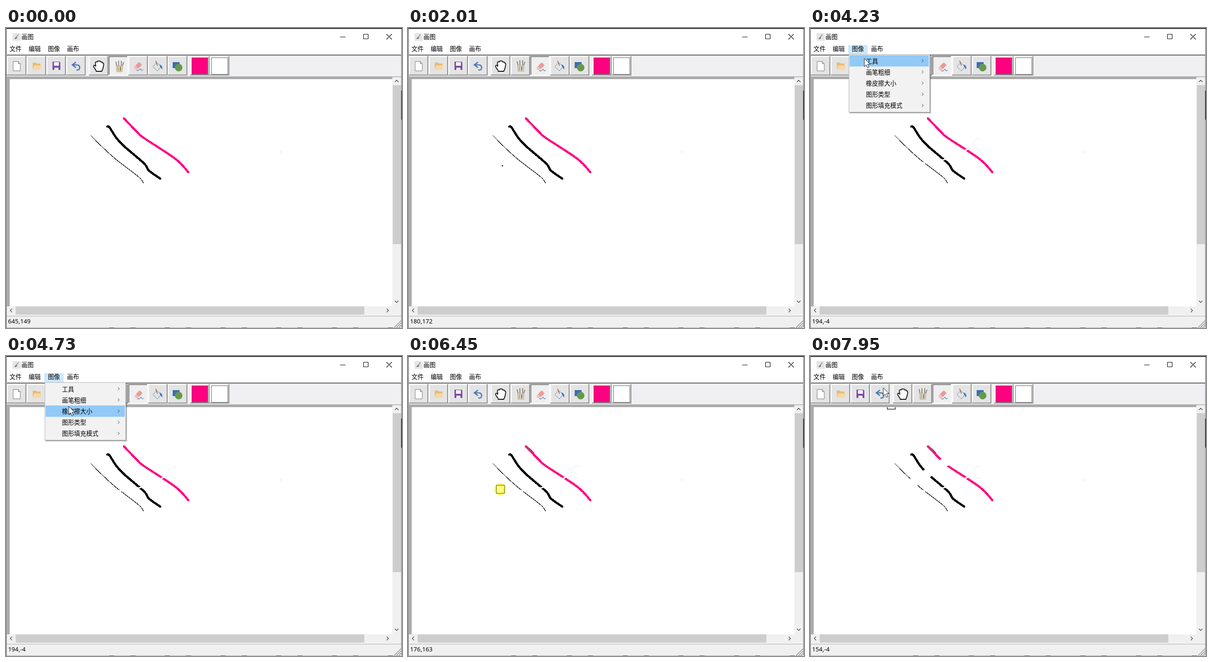
Animation, 860 px wide and 651 px high, one loop 8 s. Source, as an HTML page:

```html
<!DOCTYPE html>
<html lang="zh">
<head>
<meta charset="utf-8">
<style>
html, body { margin: 0; width: 100%; height: 100%; overflow: hidden; background: #fff; }
svg { display: block; width: 860px; height: 651px; }
text { font: 13.2px "Noto Sans", "Noto Sans CJK SC", "Noto Sans CJK", sans-serif; fill: #000; }
.line { fill: none; stroke-linecap: round; stroke-linejoin: round; }
#ink, #rubbed { shape-rendering: crispEdges; }
</style>
</head>
<body>
<svg viewBox="0 0 860 651">
  <defs>
    <clipPath id="page"><rect x="8" y="111" width="831" height="493"/></clipPath>
    <linearGradient id="fade" gradientUnits="userSpaceOnUse" x1="256" y1="196" x2="272" y2="211">
      <stop offset="0" stop-color="#ec1f7d"/><stop offset=".6" stop-color="#a9447f"/><stop offset="1" stop-color="#ff0080"/>
    </linearGradient>
  </defs>

  <!-- title bar -->
  <rect width="860" height="651" fill="#fff"/>
  <rect x="14" y="11" width="18" height="17" fill="#e6e6e6"/>
  <path d="M18 24l3-5 4 2-3 3z" fill="#7c8894"/><path d="M22 20l5-6" stroke="#8a8a8a" stroke-width="1.5"/>
  <text x="33.5" y="24">画图</text>
  <path d="M726 19.5h11M776.5 13.5h10v10h-10zM826.5 13.5l11 11m0-11l-11 11" class="line" stroke="#000" stroke-width="1.1"/>
  <rect id="hot" x="83" y="37" width="42" height="20" fill="#cce8ff"/>
  <g id="bar"></g>

  <!-- tool bar -->
  <rect x="2" y="59" width="856" height="46" fill="#f0f0f2"/>
  <rect x="2" y="57.5" width="856" height="2.5" fill="#7d7d7f"/>
  <g id="buttons"></g>
  <path d="M15.5 72.5h11l4.500 5v15.500h-15.500zM26.500 72.500v5h4.500" fill="#fff" stroke="#777"/>
  <path d="M58 75h7l2 2h8v14H58z" fill="#e6bb78"/><path d="M61 81h17l-4 10H57z" fill="#f8d8a2"/>
  <path d="M101 73h15l2 2v16h-17z" fill="#7b4ba5"/><path d="M104 74h11v8h-11zM105 86h9v5h-9z" fill="#f3eef7"/>
  <path d="M152 74l-8 6 8 6M145 80h8q7 0 7 6t-7 5" fill="none" stroke="#4677b5" stroke-width="2.600"/>
  <path d="M196 94q-1-4-4-7-3-5-1-6 2-1 4 2l-1-8q1-3 4-1 1-4 4-2 3-2 4 2 4-1 4 2 3 0 2 5-1 7-4 13z" fill="#fff" stroke="#111" stroke-width="1.800" stroke-linejoin="round"/>
  <g id="brush">
    <path d="M239 82l-2-10m6 10v-12m6 12v-12m2 12l3-9" stroke="#85786a" stroke-width="1.800"/>
    <path d="M238 81h14l-1 13h-12z" fill="#d6d2c8" stroke="#aaa59a"/>
    <path d="M242 83v9" stroke="#d9ae38" stroke-width="2.500"/><path d="M247 83v9" stroke="#8a6a4f" stroke-width="2"/>
  </g>
  <g id="rubber">
    <path d="M278 85l9-10q2-1 4 0l4 5-10 10h-4q-3-2-3-5z" fill="#ea9996"/>
    <path d="M278 85l3-3 7 6-3 3h-4q-3-2-3-6z" fill="#f4c0bd"/>
    <path d="M284 92q4 1 6-2t3 0 4 1" class="line" stroke="#5b86b9" stroke-width="1.300"/>
  </g>
  <path d="M319 84l8-9 10 8-8 10z" fill="#e0e7eb" stroke="#7a8690"/>
  <path d="M333 79q8 2 6 11l-4-5z" fill="#3e78b8"/>
  <path d="M325 71l4 11" stroke="#9a673f" stroke-width="1.600"/>
  <rect x="362" y="74" width="15" height="13" fill="#3d6db3"/><circle cx="375" cy="86" r="8.200" fill="#659a4c"/>
  <rect id="swatch" x="403.500" y="64.500" width="35" height="36" fill="#ff0080" stroke="#707070"/>
  <rect x="446.500" y="64.500" width="35" height="36" fill="#fff" stroke="#707070"/>

  <!-- page -->
  <rect x="2" y="105" width="837" height="500" fill="#ababab"/>
  <rect x="8" y="111" width="831" height="493" fill="#fff"/>
  <g clip-path="url(#page)">
    <g id="ink" class="line"></g>
    <path id="tint" d="M256 196.500L266 204 272 211" class="line" stroke="url(#fade)" stroke-width="4.600"/>
    <path d="M595 269h1.200" stroke="#777"/>
    <path id="halo" d="M371 240A13 13 0 1 0 371 265" fill="none" stroke="#dcefef"/>
    <g id="rubbed" fill="none" stroke="#fff" stroke-linejoin="round"></g>
  </g>

  <!-- scroll bars and status -->
  <rect x="839" y="105" width="19" height="499" fill="#f0f0f0"/><rect x="2" y="604" width="856" height="47" fill="#f0f0f0"/>
  <rect x="2" y="105" width="856" height="1.500" fill="#ababab"/>
  <rect x="840" y="124" width="18" height="345" fill="#cdcdcd"/><rect x="21" y="604" width="757" height="18" fill="#cdcdcd"/>
  <g id="chevrons" class="line" stroke="#505050" stroke-width="1.400"></g>
  <path d="M2 623.500h856" stroke="#fff"/><path d="M2 625h856" stroke="#a5a5a5"/>
  <path d="M843 650l15-15m-10 15l10-10m-5 10l5-5" stroke="#999" stroke-width="1.600"/>
  <text id="status" x="4.500" y="641"></text>

  <!-- window edge -->
  <rect width="860" height="2" fill="#333"/><rect width="1.500" height="651" fill="#777"/>
  <rect x="858" y="2" width="2" height="648" fill="#a2a4a8"/>
  <rect id="edge" x="858" y="136" width="2" height="63"/>
  <path d="M2 650.500h856" stroke="#aaa"/>
  <path d="M224 650.500H840" stroke="#444" stroke-dasharray="11 35 11 64"/>

  <g id="menu"></g>
  <g id="sub"></g>
  <circle id="glow" r="13" fill="#ffff4d"/>
  <g clip-path="url(#page)"><rect id="shape"/></g>
  <path id="arrow" d="M0 0V17.500L4 13.800 7 20.500 10 19.200 7.200 12.700H12.700Z" fill="#fff" stroke="#222"/>
</svg>
<script>
const $ = id => document.getElementById(id);
const set = (id, attrs) => { for (const k in attrs) $(id).setAttribute(k, attrs[k]); };
const show = (id, on) => set(id, { visibility: on ? 'visible' : 'hidden' });
const box = (x, y, w, h, fill, id = '') => `<rect id="${id}" x="${x}" y="${y}" width="${w}" height="${h}" fill="${fill}"/>`;
const column = (x, y, list) => list.map((s, i) => `<text x="${x}" y="${y + i * ROW}">${s}</text>`).join('');
const chevron = (x, y, turn, r = 3.5) =>
  `<path transform="translate(${x} ${y}) rotate(${turn})" d="M${-r / 2} ${-r}L${r / 2} 0 ${-r / 2} ${r}"/>`;
const BLUE = '#91c9f7', ROW = 24.2, SCALE = 1.093;

// tool bar and menus
$('bar').innerHTML = ['文件', '编辑', '图像', '画布'].map((s, i) => `<text x="${7.5 + i * 41.7}" y="50">${s}</text>`).join('');
$('chevrons').innerHTML = chevron(848.5, 115, -90) + chevron(848.5, 594, 90) + chevron(11, 613, 180) + chevron(829, 613, 0);

function button(x, name, face) {
  return `<g id="${name}">${box(x, 61, 42, 42, face)}
    <path class="up" d="M${x + 1} 102V62H${x + 41}" fill="none" stroke="#fff" stroke-width="2"/>
    <path class="down" d="M${x + 41.2} 61V102.200H${x}" fill="none" stroke="#858585" stroke-width="1.800"/></g>`;
}
const group = (x, names, face = '#e4e4e5') => names.map((n, i) => button(x + i * 42.9, n, face)).join('');
$('buttons').innerHTML = group(2, ['new', 'open', 'save', 'undo']) +
  group(180, ['hand', 'pen', 'eraser', 'fill', 'figure']) + group(400, ['front', 'back'], '#f0f0f0');

function press(id, on) {
  const [face, up, down] = $(id).children;
  face.setAttribute('fill', on ? '#efeff0' : '#e4e4e5');
  up.setAttribute('stroke', on ? '#7d7d7d' : '#fff');
  down.setAttribute('stroke', on ? '#fafafa' : '#858585');
}

const panel = (x, y, w, h) =>
  box(x + 2, y + 2, w, h, 'rgba(0,0,0,.35)') + box(x, y, w, h, '#b4b4b4') + box(x + 1, y + 1, w - 2, h - 2, '#f2f2f2');
const items = ['工具', '画笔粗细', '橡皮擦大小', '图形类型', '图形填充模式'];
$('menu').innerHTML = panel(84, 57, 176.5, 126) + box(86, 59, 172, 24.5, BLUE, 'pick') + column(121.5, 76.5, items) +
  `<g fill="none" stroke="#333">${items.map((s, i) => chevron(244.5, 71.2 + i * ROW, 0, 3.2)).join('')}</g>`;
$('sub').innerHTML = panel(255, 105.5, 139.5, 101.5) + box(258, 108, 134, 24.5, BLUE, 'subPick') + box(258, 108, 24, 24, BLUE) +
  '<circle cx="270" cy="120.500" r="3.200" fill="#123"/>' + column(292.5, 125, [2, 4, 8, 16].map(n => n + '像素'));

// smooth pen stroke through a few points
function stroke(color, width, pts) {
  const p = i => pts[Math.max(0, Math.min(pts.length - 1, i))];
  const lean = (i, s) => p(i).map((v, a) => v + s * (p(i + 1)[a] - p(i - 1)[a]) / 6);
  const curves = pts.slice(1).map((q, i) => `C${lean(i, 1)} ${lean(i + 1, -1)} ${q}`);
  return `<path d="M${pts[0]}${curves.join('')}" stroke="${color}" stroke-width="${width}"/>`;
}
$('ink').innerHTML =
  stroke('#000', 1.2, [[184, 233], [211, 260], [240, 286], [288, 323], [299, 337]]) +
  stroke('#000', 4.8, [[220, 214], [225, 216], [240, 239], [257, 257], [300, 294], [310, 309], [335, 327]]) +
  stroke('#ff0080', 4.6, [[256, 196], [285, 226], [300, 239], [368, 284], [396, 313]]);

// pointer moves: start, end, target, sag of the path; rub is the width of an eraser drag
const moves = [
  { t0: 100, t1: 810, to: [298, 84] },
  { t0: 1310, t1: 2010, to: [205, 299] },
  { t0: 2210, t1: 3010, to: [370.500, 252.500], sag: 11, rub: 3 },
  { t0: 3210, t1: 3910, to: [108, 48], sag: -30 },
  { t0: 4130, t1: 4230, to: [118, 66] },
  { t0: 4230, t1: 4830, to: [140, 118] },
  { t0: 4830, t1: 5430, to: [291, 180] },
  { t0: 5430, t1: 5530, to: [292, 187] },
  { t0: 5830, t1: 6230, to: [200.600, 289.200] },
  { t0: 6450, t1: 7250, to: [322, 212], rub: 20 },
  { t0: 7350, t1: 7950, to: [159, 69], sag: 25 }
];
const drags = moves.filter(m => m.rub);
$('rubbed').innerHTML = drags.map((m, i) => `<polyline id="rub${i}" stroke-width="${m.rub}"/>`).join('');

function at(t) {
  let [x, y] = [713.2, 273.9];
  for (const { t0, t1, to, sag = 0 } of moves) {
    const k = Math.max(0, Math.min(1, (t - t0) / (t1 - t0)));
    x += (to[0] - x) * k;
    y += (to[1] - y) * k + sag * Math.sin(Math.PI * k) ** 2;
  }
  return [x, y];
}
function trail(m, t) {
  const pts = [];
  for (let s = m.t0; s <= Math.min(t, m.t1); s += 50) pts.push(at(s));
  return pts.join(' ');
}

const ERASER = 1310, MENU = 4130, SUB = 4830, CHOSEN = 5700;
const within = (t, a, b) => t >= a && t < b;

function draw(ms) {
  // the screen refreshes ten times a second
  const shift = ms < 4000 ? 10 : ms < 6300 ? 30 : 50;
  const t = Math.max(0, Math.floor((ms - shift) / 100) * 100 + shift);
  const [x, y] = at(t);
  const menu = within(t, MENU, CHOSEN), sub = within(t, SUB, CHOSEN);
  const pen = t < ERASER, big = t > CHOSEN;
  const onPage = y > 106.3 && !menu;

  const [u, v] = onPage ? [x - 8.2, y - 111].map(d => Math.round(d / SCALE)) : [pen ? 320 : big ? 154 : 194, -4];
  $('status').textContent = u + ',' + v;

  press('pen', pen);
  press('eraser', !pen);
  set('brush', { transform: pen ? 'translate(1.500 1)' : '' });
  set('rubber', { transform: pen ? '' : 'translate(1.500 1)' });
  set('edge', { fill: pen ? '#1d5a9e' : '#193b8c' });

  show('hot', within(t, 3910, CHOSEN));
  show('menu', menu);
  show('sub', sub);
  const row = sub ? 2 : Math.floor((y - 59.5) / ROW), subRow = Math.floor((y - 108) / ROW);
  set('pick', { y: 59 + row * ROW, opacity: +(row >= 0) });
  set('subPick', { y: 108 + subRow * ROW, opacity: +(x > 257 && subRow >= 0) });

  drags.forEach((m, i) => set('rub' + i, { points: trail(m, t) }));
  show('halo', t > drags[0].t1);
  show('tint', big);

  const glow = drags.some(m => within(t, m.t0, m.t1 + 90));
  show('glow', glow || within(t, ERASER, ERASER + 90));
  set('glow', { cx: x, cy: y });

  const size = big ? 17.5 : 2.6;
  const [cx, cy] = onPage ? [x, y] : [8.2 + u * SCALE, 111 + v * SCALE];
  show('shape', !pen);
  set('shape', {
    x: cx - size / 2, y: cy - size / 2, width: size, height: size,
    fill: !big ? '#111' : glow ? '#ffff80' : '#fff',
    stroke: !big ? 'none' : glow ? '#66662a' : '#000', 'stroke-width': 1.2
  });
  show('arrow', !onPage);
  set('arrow', { transform: `translate(${x} ${y})` });
}

const start = performance.now();
function tick() {
  draw((performance.now() - start) % 8000);
  requestAnimationFrame(tick);
}
tick();
</script>
</body>
</html>
```
